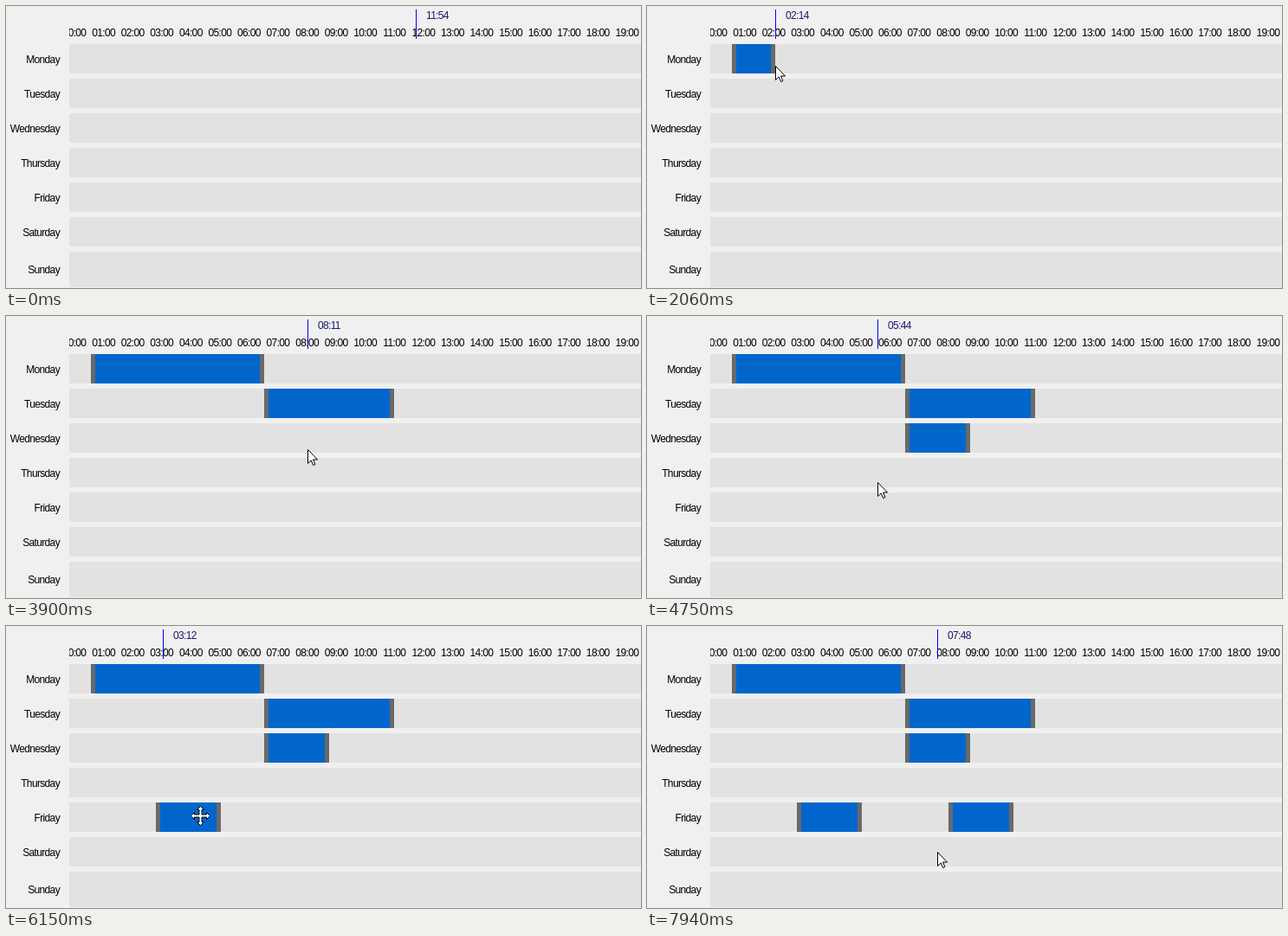
An HTML page for the animation above (8000 ms loop, 733 px wide and 326 px high).

```html
<!DOCTYPE html>
<html lang="en">
<head>
<meta charset="utf-8">
<title>Week planner</title>
<style>
html, body { margin: 0; width: 100%; height: 100%; overflow: hidden; background: #f0f0f0; }
svg { display: block; width: 733px; height: 326px; }
text { font: 12px "Liberation Sans", Arial, sans-serif; letter-spacing: -.65px; }
</style>
</head>
<body>
<svg viewBox="0 0 733 326">
  <g id="hours" text-anchor="middle"></g>
  <rect width="73" height="326" fill="#f0f0f0"/>
  <g id="rows"></g>
  <g id="blocks"></g>
  <rect id="line" y="4" width="1" height="34" fill="#00f" shape-rendering="crispEdges"/>
  <text id="clock" y="15" fill="#191970"></text>
  <path id="cursor" fill="#fff" stroke="#000"/>
</svg>
<script>
const LOOP = 8000, FRAME = 76.5;
const LEFT = 73, TOP = 44, ROW = 40, GRID = 25, PX_PER_MIN = 0.55965;
const DAYS = ['Monday', 'Tuesday', 'Wednesday', 'Thursday', 'Friday', 'Saturday', 'Sunday'];

const ARROW = 'M.5 .5V16.5L4.2 12.9 6.7 18.5 8.9 17.5 6.5 12H11.5Z';
const MOVE = 'M.5-10.5l4 4h-2.5v5.5h5.5v-2.5l4 4-4 4v-2.5h-5.5v5.5h2.5l-4 4-4-4h2.5v-5.5h-5.5v2.5l-4-4 4-4v2.5h5.5v-5.5h-2.5z';

// pointer gestures: start, end, x and y reached, kind
const HOME = { x: 473, y: 330 };
const GESTURES = [
  [203, 1050, 128, 84],
  [1050, 1580, 93, 69],
  [1753, 2440, 290, 69, 'drag'],
  [2513, 2744, 204, 120],
  [2744, 3060, 299, 104],
  [3060, 3440, 440, 108, 'drag'],
  [3593, 3900, 348, 154],
  [3900, 4060, 373, 146],
  [4060, 4360, 308, 142, 'drag'],
  [4513, 4746, 266, 192],
  [4746, 5290, 251, 217],
  [5383, 5990, 181, 218, 'drag'],
  [5990, 6150, 224, 219, 'hover'],
  [6223, 6530, 247, 219, 'hover'],
  [6933, 7160, 352, 218],
  [7160, 7540, 427, 218, 'drag'],
  [7633, 7940, 335, 261]
].map(([start, end, x, y, kind]) => ({ start, end, x, y, kind }));

const $ = id => document.getElementById(id);
const pad = n => String(n).padStart(2, '0');
const snap = x => LEFT + GRID * Math.round((x - LEFT) / GRID);

function add(parent, tag, attrs, text = '') {
  const el = document.createElementNS('http://www.w3.org/2000/svg', tag);
  set(el, attrs);
  el.textContent = text;
  return parent.appendChild(el);
}

function set(el, attrs) {
  for (const key in attrs) el.setAttribute(key, attrs[key]);
}

// share of a gesture done at time t, in whole screen updates
function progress({ start, end, kind }, t) {
  const steps = Math.round((end - start) / FRAME);
  const p = Math.min(1, Math.max(0, (t - start) / (end - start)));
  return Math.pow(Math.floor(p * steps) / steps, kind === 'drag' ? 1.57 : 1);
}

for (let h = 0; h < 20; h++) add($('hours'), 'text', { x: 79 + 33.57 * h, y: 35 }, pad(h) + ':00');

DAYS.forEach((day, i) => {
  const height = i === 6 ? 41 : 34, y = TOP + ROW * i;
  add($('rows'), 'rect', { x: LEFT, y, width: 660, height, fill: '#e2e2e2' });
  add($('rows'), 'text', { x: 62, y: y + Math.floor(height / 2) + 5, 'text-anchor': 'end' }, day);
});

for (const g of GESTURES.filter(g => g.kind === 'drag')) {
  const box = { y: TOP + ROW * Math.floor((g.y - TOP) / ROW), height: 34 };
  g.frame = add($('blocks'), 'rect', { ...box, fill: '#696969' });
  g.body = add($('blocks'), 'rect', { ...box, fill: '#06c' });
}

function drawBlock(g, from, to) {
  const a = snap(from), b = snap(to);
  const x = Math.min(a, b), width = Math.abs(b - a);
  set(g.frame, { x, width });
  set(g.body, { x: x + 5, width: Math.max(0, width - 10) });
}

function draw(t) {
  let { x, y } = HOME, mark = x, shape = ARROW;
  for (const g of GESTURES) {
    const k = progress(g, t), from = x;
    x += (g.x - x) * k;
    y += (g.y - y) * k;
    if (g.kind === 'drag') drawBlock(g, from, x);
    if (k > 0) shape = g.kind === 'hover' ? MOVE : ARROW;
    // blocks swallow the pointer, so the time marker stays
    if (k > 0 && g.kind !== 'hover') mark = Math.round(x);
  }

  const minutes = Math.floor((mark - LEFT) / PX_PER_MIN);
  set($('line'), { x: mark });
  set($('clock'), { x: mark + 12 });
  $('clock').textContent = pad(Math.floor(minutes / 60)) + ':' + pad(minutes % 60);
  set($('cursor'), { d: shape, transform: `translate(${Math.round(x)} ${Math.round(y)})` });
}

const begin = performance.now();
function tick() {
  draw((performance.now() - begin) % LOOP);
  requestAnimationFrame(tick);
}
tick();
</script>
</body>
</html>
```
